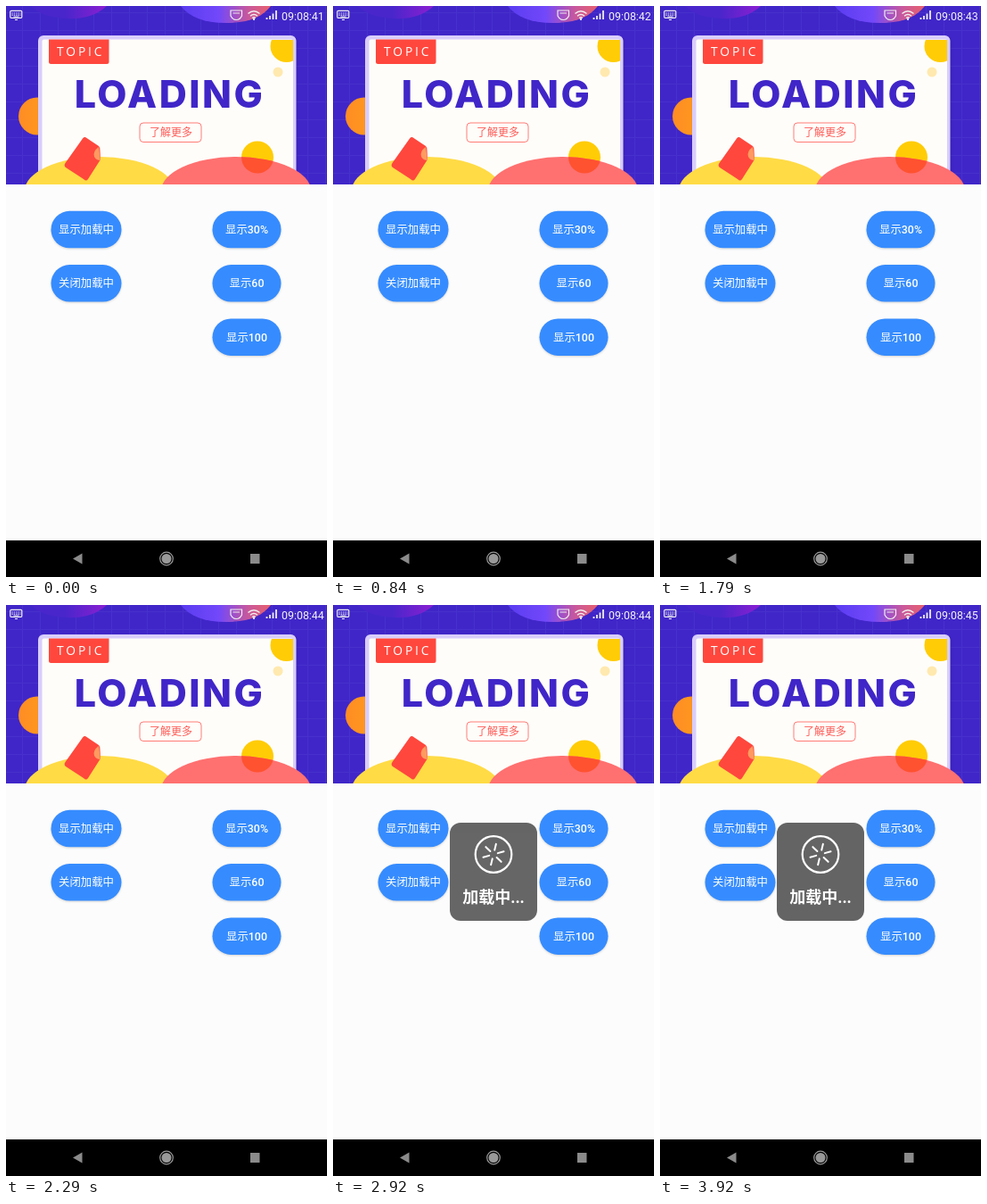
An HTML page that plays this animation: 360 px wide and 640 px high, repeating every 3.96 s.

```html
<!DOCTYPE html>
<html lang="zh-CN">
<head>
<meta charset="utf-8">
<title>Loading dialog</title>
<style>
html, body { margin: 0; width: 100%; height: 100%; overflow: hidden; background: #fcfcfc; }
svg { display: block; width: 360px; height: 640px; font-family: Roboto, "Noto Sans CJK SC", "Noto Sans CJK", sans-serif; }
.mid { text-anchor: middle; }
</style>
</head>
<body>
<svg viewBox="0 0 360 640">
  <defs>
    <pattern id="grid" width="20" height="20" x="18" y="7" patternUnits="userSpaceOnUse">
      <path d="M0 .5H20M.5 0V20" stroke="#4730cc" fill="none"/>
    </pattern>
    <linearGradient id="plum"><stop offset=".45" stop-color="#4826cb"/><stop offset="1" stop-color="#8c1fd2"/></linearGradient>
    <linearGradient id="violet"><stop offset="0" stop-color="#5a3cf0"/><stop offset=".42" stop-color="#7248fa"/><stop offset=".75" stop-color="#c8589c"/><stop offset="1" stop-color="#e8606c"/></linearGradient>
    <linearGradient id="orange"><stop offset="0" stop-color="#ff8c24"/><stop offset="1" stop-color="#ffa01c"/></linearGradient>
    <clipPath id="inner"><path d="M41 38H322V200H41Z"/></clipPath>
    <clipPath id="hill"><ellipse cx="258" cy="207" rx="84" ry="38"/></clipPath>
    <filter id="soft" x="-20%" y="-20%" width="140%" height="160%"><feGaussianBlur stdDeviation="1.2"/></filter>
  </defs>

  <!-- banner -->
  <path fill="#4026c8" d="M0 0H360V200H0Z"/>
  <path fill="url(#grid)" d="M0 0H360V200H0Z"/>
  <path fill="url(#plum)" d="M28 0H113C102 10 88 15 68 14C48 13 36 8 28 0Z"/>
  <path fill="url(#violet)" d="M196 0H297C288 12 272 19 247 19C222 19 205 12 196 0Z"/>
  <circle cx="35" cy="123.500" r="21" fill="url(#orange)"/>
  <rect x="37" y="35" width="290" height="190" rx="6" fill="#2a1699" opacity=".4" filter="url(#soft)"/>
  <rect x="36" y="33" width="289.500" height="190" rx="6" fill="#d8cdfb"/>
  <rect x="40.500" y="37.500" width="281.500" height="190" rx="2" fill="#fffdf9"/>
  <g clip-path="url(#inner)">
    <circle cx="314.500" cy="45" r="18" fill="#ffcc05"/>
    <circle cx="305" cy="74" r="5.500" fill="#ffe9ae"/>
  </g>
  <path fill="#ff473d" d="M48 37.500H115.500V62.500Q115.500 65 113 65H50.500Q48 65 48 62.500Z"/>
  <text x="57" y="56" font-size="13.800" letter-spacing="2.900" fill="#fff" font-family="Open Sans, sans-serif">TOPIC</text>
  <text x="183.500" y="113.500" class="mid" font-family="Inter, sans-serif" font-weight="800" font-size="43" letter-spacing="2.500" fill="#4026c8">LOADING</text>
  <rect x="150" y="131" width="69" height="21.500" rx="4" fill="#fffdf9" stroke="#ff7c78"/>
  <text x="185" y="146" class="mid" font-size="12" fill="#ff5b57">了解更多</text>
  <ellipse cx="105" cy="207" rx="84" ry="38" fill="#ffdb45"/>
  <circle cx="282" cy="169.500" r="18" fill="#ffcc05"/>
  <ellipse cx="258" cy="207" rx="84" ry="38" fill="#ff7070"/>
  <circle cx="282" cy="169.500" r="18" fill="#ff5230" clip-path="url(#hill)"/>
  <path fill="#ff473d" d="M86 148.500Q88 146 90.500 148L104 157Q106 159 105.500 162L106 172L92 194Q90 197 87 194L67 181Q64.500 179 66.500 176Z"/>
  <path fill="#ff9a60" d="M104 158Q97 163 99 169Q101 173 106 173Z"/>

  <!-- page -->
  <path fill="#fcfcfc" d="M0 200H360V599H0Z"/>
  <g id="buttons"></g>

  <!-- status bar -->
  <g fill="none" stroke="#eee" stroke-width="1.200">
    <rect x="4.800" y="5.300" width="13" height="8" rx="1"/>
    <path stroke-dasharray="1.300 1" d="M6.500 8H16.500M6.500 10.200H16.500"/>
    <path d="M8.500 12H14.500M10 15.500H13"/>
    <path d="M252 5H264.500V11Q262.500 15.500 258.200 15.500Q254 15.500 252 11ZM254.500 8H262"/>
    <path stroke-width="1.500" d="M271.500 8.500Q278 3 284.500 8.500M274 11.200Q278 7.800 282 11.200M276.200 13.500Q278 12 279.800 13.500"/>
    <path stroke-width="1.800" d="M292.500 15V13M296 15V11M299.500 15V8.500M303 15V5"/>
  </g>
  <circle cx="278" cy="14.700" r="1.200" fill="#eee"/>
  <text id="clock" x="309" y="15.500" font-size="12.400" fill="#f2f2f2"></text>

  <!-- navigation bar -->
  <path d="M0 599H360V640H0Z"/>
  <path fill="#8b8b8b" d="M75 619.500L85.500 613.500V625.500ZM274 614H284.500V625H274Z"/>
  <circle cx="180" cy="619.500" r="5.500" fill="#999"/>
  <circle cx="180" cy="619.500" r="7.300" fill="none" stroke="#999" stroke-width="1.200"/>

  <g id="dialog">
    <rect x="131" y="244" width="98" height="110" rx="12" fill-opacity=".6"/>
    <g fill="none" stroke="#fff" stroke-width="2.200">
      <circle cx="180" cy="279.500" r="20.300"/>
      <g id="spokes" stroke-width="2" stroke-linecap="round"></g>
    </g>
    <text x="180" y="334" class="mid" font-size="18" font-weight="700" fill="#fff">加载中...</text>
  </g>
</svg>
<script>
const LOOP = 3960, FIRST_TICK = 230, SHOW_AT = 2738, FADE = 200, TURN = 1500;
const el = id => document.getElementById(id);

// Digits are set heavier than the Chinese text beside them.
const label = s => s.replace(/[\d%]+/, '<tspan font-weight="500">$&</tspan>');

const button = (x, y, w, s) => `
  <rect x="${x}" y="${y + 1}" width="${w}" height="41.500" rx="20.750" fill="#888" opacity=".35" filter="url(#soft)"/>
  <rect x="${x}" y="${y}" width="${w}" height="41.500" rx="20.750" fill="#368cff"/>
  <text x="${x + w / 2}" y="${y + 25.3}" class="mid" font-size="12.400" fill="#fff">${label(s)}</text>`;

const column = (x, w, labels) =>
  labels.map((s, i) => button(x, 229.8 + 60.3 * i, w, s)).join('');

el('buttons').innerHTML =
  column(50.5, 79, ['显示加载中', '关闭加载中']) +
  column(231.5, 77, ['显示30%', '显示60', '显示100']);

el('spokes').innerHTML = [0, 60, 120, 180, 240, 300].map(a =>
  `<path d="M185 279.500H192" transform="rotate(${a} 180 279.500)"/>`).join('');

function draw(now) {
  const t = now % LOOP;
  const ticks = Math.max(0, Math.floor((t - FIRST_TICK) / 1000) + 1);
  el('clock').textContent = '09:08:' + (41 + ticks);

  const p = Math.min(1, Math.max(0, (t - SHOW_AT) / FADE));
  el('dialog').setAttribute('opacity', 1 - (1 - p) ** 2);
  el('spokes').setAttribute('transform', `rotate(${(t - SHOW_AT) / TURN * 360} 180 279.500)`);
}

const start = performance.now();
function loop() {
  draw(performance.now() - start);
  requestAnimationFrame(loop);
}
loop();
</script>
</body>
</html>
```
